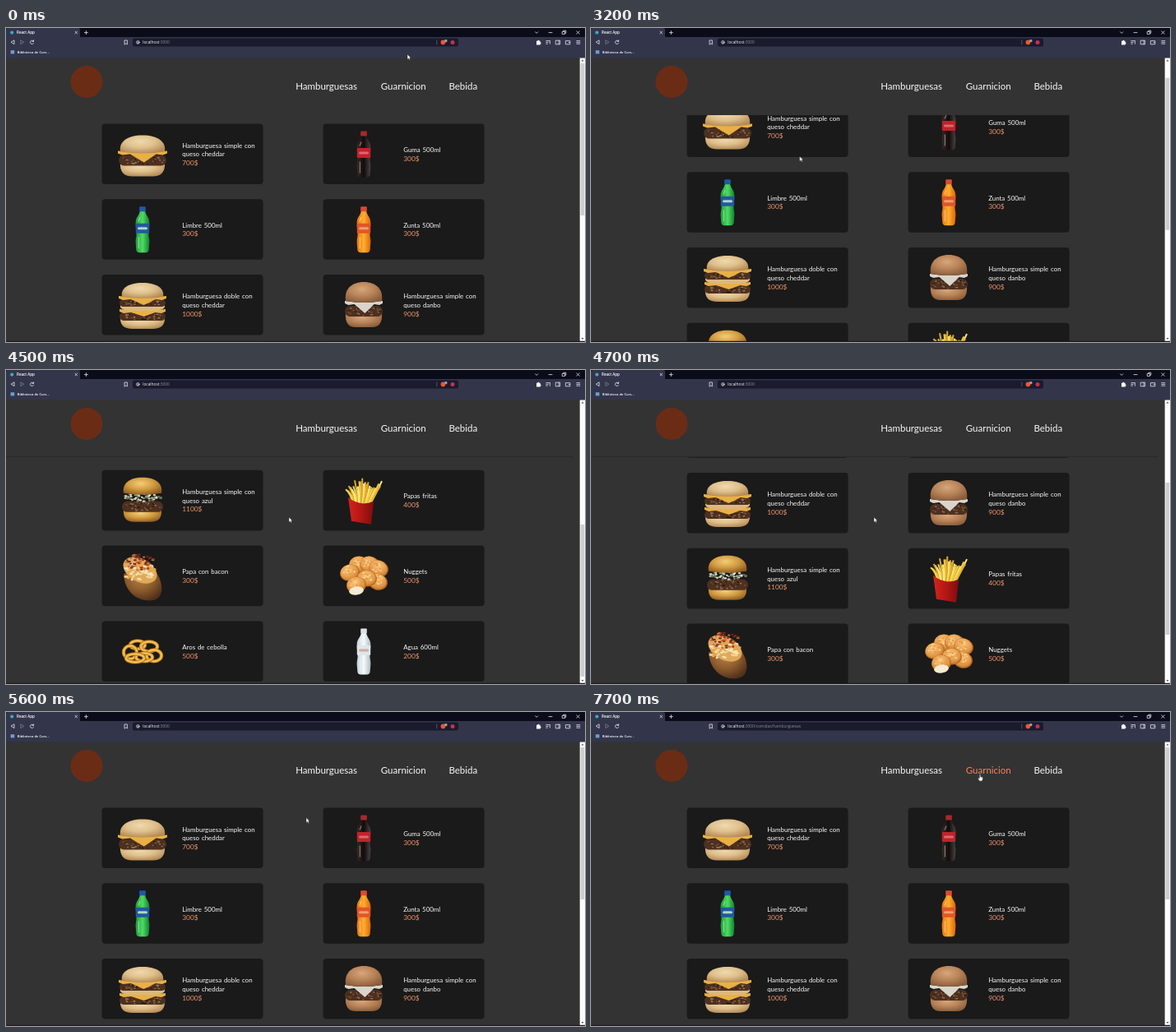
Recreate the animation shown at these times as an HTML page. Size 704 by 382 pixels, loop 8000 ms.

```html
<!DOCTYPE html>
<html lang="es">
<head>
<meta charset="utf-8">
<title>React App</title>
<style>
html, body { margin: 0; width: 100%; height: 100%; overflow: hidden; background: #333; }
svg { display: block; }
text { white-space: pre; }
.ui { font: 600 4.5px "Open Sans", "Noto Sans", sans-serif; fill: #fff; }
.url { font: 400 4.85px "Open Sans", "Noto Sans", sans-serif; fill: #fff; }
.nav { font: 400 11.5px Lato, sans-serif; fill: #f8f8f8; }
.item { font: 400 7.9px Lato, sans-serif; word-spacing: .1em; fill: #fafafa; }
.price { font: 400 8.4px Lato, sans-serif; fill: #ee946c; }
.line { fill: none; stroke: #e4e4ec; stroke-width: .8; stroke-linecap: round; stroke-linejoin: round; }
</style>
</head>
<body>
<svg id="stage" width="704" height="382" viewBox="0 0 704 382" xmlns="http://www.w3.org/2000/svg"></svg>
<script>
const LOOP = 8000, STEP = 100;

let seed = 7;
const rnd = () => (seed = (seed * 16807) % 2147483647) / 2147483647;
const range = (n, fn) => Array.from({ length: n }, (_, i) => fn(i)).join('');

const rect = (x, y, w, h, fill, r = 0) =>
  `<rect x="${x}" y="${y}" width="${w}" height="${h}" rx="${r}" fill="${fill}"/>`;
const oval = (x, y, rx, ry, fill, turn = 0) =>
  `<ellipse cx="${x}" cy="${y}" rx="${rx}" ry="${ry}" fill="${fill}" transform="rotate(${turn} ${x} ${y})"/>`;
const path = (d, fill) => `<path d="${d}" fill="${fill}"/>`;
const line = d => `<path class="line" d="${d}"/>`;
const text = (cls, x, y, str, id = '') =>
  `<text class="${cls}" x="${x}" y="${y}"${id && ` id="${id}"`}>${str}</text>`;
const stops = colors => colors.map((c, i) =>
  `<stop offset="${i / (colors.length - 1)}" stop-color="${c}"/>`).join('');
const across = (id, ...colors) => `<linearGradient id="${id}">${stops(colors)}</linearGradient>`;
const round = (id, ...colors) =>
  `<radialGradient id="${id}" cx=".45" cy=".35" r=".68">${stops(colors)}</radialGradient>`;

// Random specks inside an ellipse
const crumbs = (n, x, y, rx, ry, colors, size) => range(n, i => {
  const a = rnd() * 6.283, d = Math.sqrt(rnd());
  return oval((x + rx * d * Math.cos(a)).toFixed(1), (y + ry * d * Math.sin(a)).toFixed(1),
    (size * (.6 + rnd() * .6)).toFixed(1), (size * .6).toFixed(1), colors[i % colors.length]);
});

// Food, drawn around (0, 0)
const bunTop = (w, y, h, fill) => path(
  `M${-w} ${y + h}C${-w - 2} ${y + h * .4} ${-w * .7} ${y} 0 ${y}S${w + 2} ${y + h * .4} ${w} ${y + h}Q0 ${y + h + 4} ${-w} ${y + h}Z`, fill);
const bunBase = (w, y, h, fill) => path(
  `M${-w} ${y}Q0 ${y + 4} ${w} ${y}C${w + 1} ${y + h * .7} ${w * .85} ${y + h} ${w * .45} ${y + h}H${-w * .45}C${-w * .85} ${y + h} ${-w - 1} ${y + h * .7} ${-w} ${y}Z`, fill);
const patty = (w, y, h) => rect(-w, y, 2 * w, h, '#4d3020', h / 2) +
  crumbs(40, 0, y + h / 2, w - 2, h / 2 - 1, ['#7d573c', '#2b1a12', '#9a7757'], 1.4);
// Slice with one corner hanging in front
const cheese = (w, y, drop, fill) => path(
  `M${-w} ${y}Q0 ${y + 4} ${w} ${y}L${w} ${y + 3}L${w * .82} ${y + 5}L${w * .55} ${y + 4}L${w * .06} ${y + drop}L${-w * .5} ${y + 4}L${-w * .82} ${y + 5}L${-w} ${y + 3}Z`, fill);

const bottle = (cap, body, label, stripe) =>
  path('M-3 -24C-3.2 -17 -8.4 -16 -8.4 -8C-8.4 -2 -7.4 1 -7.4 5C-7.4 9 -8.4 11 -8.4 15L-7.6 25Q-6.6 28.5 -3 28H3Q6.6 28.5 7.6 25L8.4 15C8.4 11 7.4 9 7.4 5C7.4 1 8.4 -2 8.4 -8C8.4 -16 3.2 -17 3 -24Z', `url(#${body})`) +
  rect(-3.8, -28, 7.6, 6, cap, 1) + rect(-8.2, -7.5, 16.4, 12, label, 1) +
  rect(-6, -3, 12, 3, stripe, 1.5) +
  '<path d="M-4.6 9V23M-3 -15L-5 -10" stroke="#fff" stroke-opacity=".4" stroke-width="1.3" fill="none"/>';

const food = {
  cheddar: () => bunBase(27, 9, 18, 'url(#tan)') + patty(29, 1, 13) +
    cheese(30, -4, 14, '#e9b044') + bunTop(27, -23, 20, 'url(#tan)'),
  doble: () => bunBase(27, 13, 16, 'url(#tan)') + patty(28, 9, 10) + cheese(28, 5, 9, '#e9b044') +
    bunBase(27, 0, 7, '#dcb981') + patty(28, -7, 9) + cheese(29, -11, 11, '#e9b044') +
    bunTop(25, -27, 17, 'url(#tan)'),
  danbo: () => bunBase(22, 9, 18, 'url(#brown)') + patty(23, 1, 13) +
    cheese(23, -5, 15, '#d9d5cc') + bunTop(22, -28, 23, 'url(#brown)'),
  azul: () => bunBase(23, 10, 16, 'url(#gold)') + patty(25, 1, 13) +
    crumbs(60, 0, -4, 23, 5, ['#d3d4bf', '#8f9678', '#eeecd8', '#6a6e52'], 1.8) +
    bunTop(23, -28, 19, 'url(#gold)'),
  fritas: () => range(25, i => {
    const a = (i * 7 % 25 - 12) / 12, h = 16 + rnd() * 12;
    return `<path d="M${(a * 10 - 3).toFixed(1)} 6Q${(a * 15).toFixed(1)} -8 ${(a * 22).toFixed(1)} ${(-h + Math.abs(a) * 4).toFixed(1)}" fill="none" stroke="${['#f2cf45', '#ffea86', '#e0a92b'][i % 3]}" stroke-width="2"/>`;
  }) + path('M-19 -4Q-5 8 12 1L9 29L-15 25Z', 'url(#red)'),
  papa: () => path('M-23 -2C-22 18 -8 30 8 30C20 30 25 22 23 11C21 -2 12 -12 0 -14Z', 'url(#skin)') +
    oval(-3, -7, 22, 14, '#dfa95c', 28) +
    crumbs(60, -3, -5, 20, 12, ['#f3d394', '#e8a54d', '#f8e3b1'], 2.4) +
    crumbs(52, -3, -17, 17, 10, ['#9a3a20', '#c96a38', '#74281a'], 1.9),
  nuggets: () => [[-6, -14], [7, -14], [18, -9], [-17, -4], [17, 7], [4, 3], [-9, 11]].map(([x, y]) =>
    oval(x, y, 12, 10, '#bf6f26', x) + oval(x - .5, y - .8, 11, 9, 'url(#fried)', x) +
    crumbs(16, x - 1, y - 2, 8, 6, ['#fbd08a', '#e09a48'], 1.5)).join('') + oval(-9, 18, 9, 5, '#f7ead2', -8),
  aros: () => [[-6, -8, 9, 5], [8, -6, 10, 6], [-15, 1, 8, 8], [14, 5, 9, 7], [2, 7, 10, 5], [-9, 8, 11, 5]].map(([x, y, rx, ry]) =>
    [['#a9681a', 4.4], ['#e9ae3c', 3], ['#f8d271', .8]].map(([c, w]) =>
      `<ellipse cx="${x}" cy="${y}" rx="${rx}" ry="${ry}" fill="none" stroke="${c}" stroke-width="${w}"/>`
    ).join('')).join(''),
  cola: () => bottle('#a8272a', 'dark', '#c0222c', '#d9696c'),
  lima: () => bottle('#1d5aa8', 'green', '#2358a0', '#a9d8c0'),
  naranja: () => bottle('#dd4a30', 'orange', '#e2552a', '#f0a060'),
  agua: () => bottle('#d8e2ea', 'clear', '#dfe6ea', '#d3a8a4')
};

const menu = [
  ['cheddar', 'Hamburguesa simple con|queso cheddar', 700], ['cola', 'Guma 500ml', 300],
  ['lima', 'Limbre 500ml', 300], ['naranja', 'Zunta 500ml', 300],
  ['doble', 'Hamburguesa doble con|queso cheddar', 1000], ['danbo', 'Hamburguesa simple con|queso danbo', 900],
  ['azul', 'Hamburguesa simple con|queso azul', 1100], ['fritas', 'Papas fritas', 400],
  ['papa', 'Papa con bacon', 300], ['nuggets', 'Nuggets', 500],
  ['aros', 'Aros de cebolla', 500], ['agua', 'Agua 600ml', 200]
];

const card = ([pic, name, price], i) => {
  const rows = name.split('|'), y = rows.length > 1 ? 29.3 : 34.6;
  return `<g transform="translate(${i % 2 ? 385.6 : 116.6} ${116.4 + 91.8 * (i >> 1)})">
    ${rect(0, 0, 196, 73.6, '#1a1a1a', 4)}
    <g transform="translate(49.4 37)">${food[pic]()}</g>
    ${rows.map((r, k) => text('item', 97.6, y + 10.6 * k, r)).join('')}
    ${text('price', 97.6, y + 10.6 * rows.length, price + '$')}</g>`;
};

const defs = `<defs>
  ${round('tan', '#efd9ae', '#dfc08c', '#b48a55')}
  ${round('brown', '#d6a67c', '#b98459', '#8a5c3b')}
  ${round('gold', '#f3cd78', '#d39d42', '#8f5c20')}
  ${round('fried', '#f9c67c', '#ec a658'.replace(' ', ''), '#d08535')}
  ${round('skin', '#b98048', '#91602f', '#53301a')}
  ${across('red', '#d3241c', '#b31714', '#7e0d0d')}
  ${across('dark', '#3a2a28', '#120b0b', '#4b4141')}
  ${across('green', '#1d9a3c', '#4fdc62', '#128032')}
  ${across('orange', '#e8760f', '#ffae2e', '#dd650c')}
  ${across('clear', '#c4d0d8', '#f6fafb', '#aebcc6')}
</defs>`;

const header = rect(0, 36, 698, 70, '#333') +
  `<g id="edge">${rect(0, 105, 690, 1, '#2a2a2a')}</g>` +
  '<circle cx="98" cy="65.5" r="19.5" fill="#6b2c16"/>' +
  text('nav', 352.2, 75, 'Hamburguesas', 'burgers') +
  text('nav', 455.8, 75, 'Guarnicion', 'sides') +
  text('nav', 538.4, 75, 'Bebida');

const scrollbar = rect(697.7, 36, 6.3, 346, '#fbfbfb') +
  `<g id="thumb">${rect(698.6, 43, 4.6, 185, '#cdcdcf')}</g>` +
  path('M699.5 40.5L701 38.5L702.5 40.5Z', '#555') + path('M699.5 377L701 379L702.5 377Z', '#555');

const browser = rect(0, 0, 704, 11.5, '#0a0c1a') + rect(0, 0, 90, 13, '#33354b', 2) +
  rect(0, 11, 704, 25.5, '#33354b') +
  '<circle cx="7.2" cy="5.6" r="2.1" fill="#3fa9c4"/>' + text('ui', 13, 7.3, 'React App') +
  line('M84 4.2l2.6 2.6m0-2.6l-2.6 2.6M95.4 5.6h4M97.4 3.6v4') +
  line('M643.6 4.8l1.6 1.6l1.6-1.6M660 5.6h4M676.6 4.4h3v3h-3zM677.8 4.2v-1h3v3h-1M693.8 3.8l3.4 3.4m0-3.4l-3.4 3.4') +
  line('M10 15.2v4.4l-3.6-2.2z') +
  `<g opacity=".4">${line('M17.8 15.2v4.4l3.6-2.2z')}</g>` +
  line('M33.4 16a2.2 2.2 0 1 0 .2 2.4M33.6 14.8v1.6h-1.6') + line('M144.4 15h3v5l-1.5-1.3l-1.5 1.3z') +
  rect(154, 12.6, 396, 10, '#1a1b2d', 2) +
  '<circle cx="160.4" cy="17.4" r="1.8" class="line"/>' + line('M160.4 17v1.4') +
  `<text class="url" x="166.2" y="19.1">localhost<tspan fill="#8d8e9c">:3000<tspan id="route">/comidas/hamburguesas</tspan></tspan></text>` +
  rect(523.6, 14.4, .6, 6, '#77788a') +
  '<circle cx="531.4" cy="17.4" r="2.8" fill="#f0562b"/><circle cx="543" cy="17.4" r="2.5" fill="#c4314f"/>' +
  rect(533.2, 14, 3.2, 3.2, '#9a9bab', .8) +
  path('M645 15.8h1.4a1 1 0 0 1 2 0h1.2v1.6a1 1 0 0 1 0 2v1.2h-4.6z', '#fff') +
  line('M656.8 15.6h4M656.8 17.4h2.4M656.8 19.2h1.6M661.4 15.6v3.6') +
  line('M668.6 15.2h5v4.6h-5zM672 15.2v4.6M680.8 15.6h5v4.2h-5zM684 17.6h1.6M693.8 15.6h4M693.8 17.4h4M693.8 19.2h4') +
  rect(5.6, 27.2, 4.6, 4.2, '#6f9dcb') +
  `<g style="font-size:4.1px">${text('ui" style="font-size:inherit', 13.8, 31, 'Biblioteca de Curs...')}</g>`;

const cursor = `<g id="cursor">
  <path id="arrow" d="M0 0V6.2L1.5 4.9L2.5 7L3.5 6.5L2.6 4.5H4.4Z" fill="#fff" stroke="#111" stroke-width=".4"/>
  <path id="hand" d="M-.7 .7Q0 -.4 .7 .7V3.4L3.2 4.1Q3.7 4.4 3.5 5.4L2.7 8.6H-.8L-2.6 5.4Q-2.4 4.4 -1.5 4.9L-.7 5.5Z" fill="#fff" stroke="#111" stroke-width=".4"/>
</g>`;

document.getElementById('stage').innerHTML = defs + rect(0, 36, 704, 346, '#333') +
  `<g id="list">${menu.map(card).join('')}</g>` + header + scrollbar +
  rect(0, 380.8, 704, 1.2, '#24181f') + browser + cursor;

// Each table row is [time, value]; values advance in 100 ms steps between rows
function play(id, table, frame) {
  const rows = [...table, [LOOP, table[table.length - 1][1]]];
  const keys = rows.map(([t, v], i) => ({
    ...frame(v), offset: t / LOOP,
    easing: i < rows.length - 1 ? `steps(${Math.round((rows[i + 1][0] - t) / STEP)}, end)` : 'linear'
  }));
  document.getElementById(id).animate(keys, { duration: LOOP, iterations: Infinity });
}

// Hard on/off: visible inside the given spans
function show(id, spans, invert = false) {
  const table = [[0, 0]];
  for (const [from, to] of spans) {
    table.push([from - STEP, 0], [from, 1]);
    if (to < LOOP) table.push([to - STEP, 1], [to, 0]);
  }
  play(id, table, v => ({ opacity: invert ? 1 - v : v }));
}

const scroll = [[0, 0], [2900, 0], [3000, 4], [3100, 15], [3200, 33], [3600, 213], [3800, 270], [4500, 270],
  [4600, 240], [4700, 175], [4800, 100], [4900, 50], [5000, 20], [5300, 0]];
play('list', scroll, v => ({ transform: `translate(0px, ${-v}px)` }));
play('thumb', scroll, v => ({ transform: `translate(0px, ${v * .537}px)` }));

play('cursor', [[0, [488, 32]], [400, [382, 128]], [500, [364, 139]], [600, [364, 139]], [800, [361, 137]],
  [1500, [361, 137]], [1800, [306, 141]], [2100, [253.6, 156]], [3200, [253.6, 156]], [3600, [312, 172]],
  [3800, [344, 179]], [5300, [344, 179]], [5900, [386, 78]], [6200, [396, 73]], [6300, [400, 73]],
  [6700, [452, 77]], [7100, [471, 75]], [7300, [473, 75.4]]],
  ([x, y]) => ({ transform: `translate(${x}px, ${y}px)` }));

const hands = [[3500, 3800], [5900, 6600], [6800, LOOP]];
show('hand', hands);
show('arrow', hands, true);
show('route', [[6100, LOOP]]);
show('edge', [[3300, 5300]]);

const WHITE = '#f8f8f8', CORAL = '#ff7f5a', fill = v => ({ fill: v });
play('burgers', [[0, WHITE], [5900, WHITE], [6200, CORAL], [6500, CORAL], [6900, WHITE]], fill);
play('sides', [[0, WHITE], [6800, WHITE], [7100, CORAL]], fill);
</script>
</body>
</html>
```
